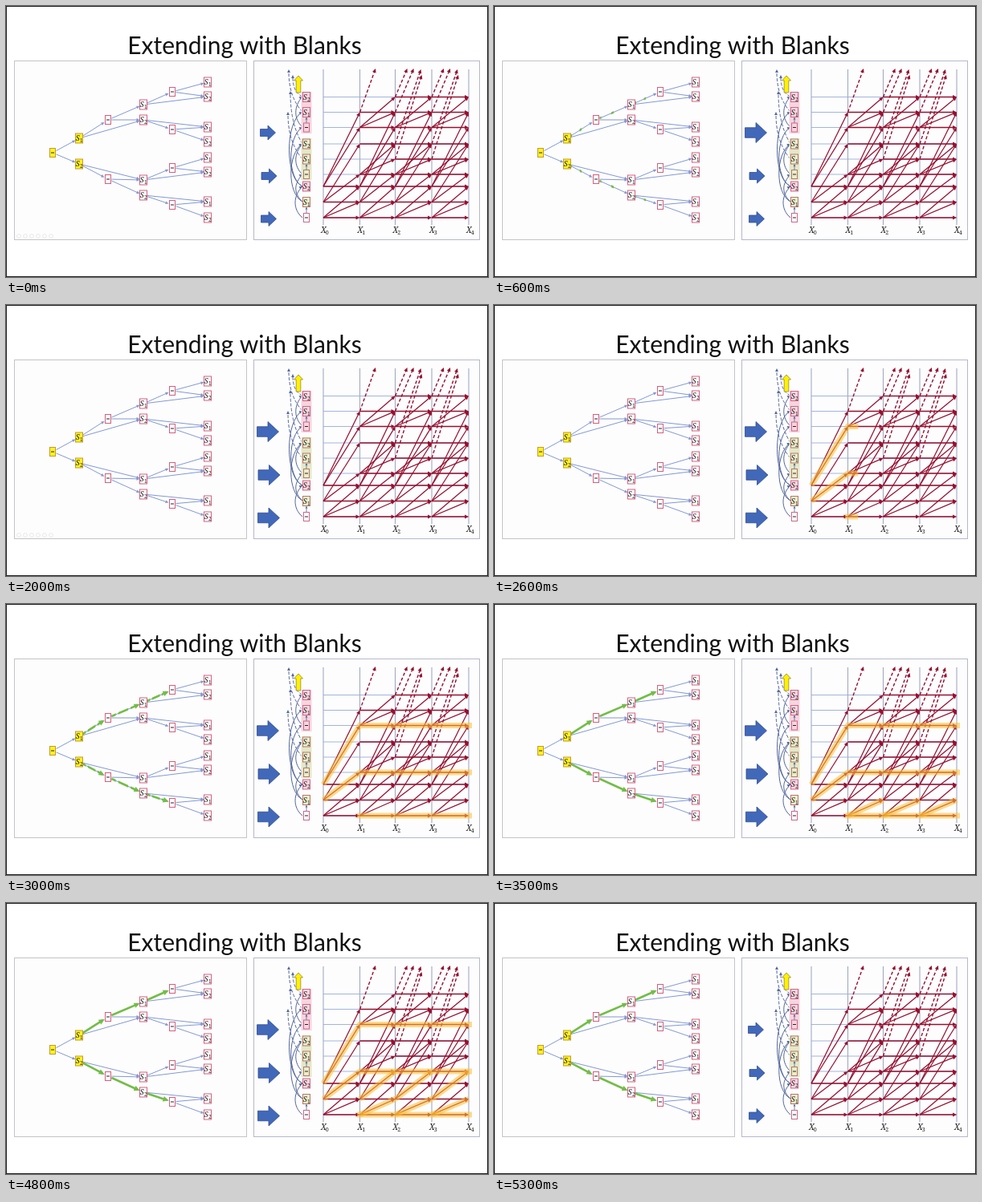
Recreate the animation shown at these times as an HTML page with a canvas. Size 600 by 338 pixels, loop 5.4 s.

```html
<!DOCTYPE html>
<html lang="en">
<head>
<meta charset="utf-8">
<title>Extending with Blanks</title>
<style>
html, body { margin: 0; width: 100%; height: 100%; overflow: hidden; background: #fff; }
canvas { display: block; width: 600px; height: 338px; }
</style>
</head>
<body>
<canvas id="stage" width="600" height="338"></canvas>
<script>
const ctx = document.getElementById('stage').getContext('2d');
const LOOP = 5400, STEP = 100;
const BLUE = '#8299d2', RED = '#96102f', GREEN = '#72bd46', INK = '#526699';
const SERIF = '"Noto Serif", "Liberation Serif", serif';

const clamp = v => Math.max(0, Math.min(1, v));
const ramp = (t, start, length) => clamp((t - start) / length);

function path(points, color, width, dash = []) {
  ctx.beginPath();
  points.forEach(([x, y]) => ctx.lineTo(x, y));
  ctx.strokeStyle = color;
  ctx.lineWidth = width;
  ctx.setLineDash(dash);
  ctx.stroke();
  ctx.setLineDash([]);
}

function head(x, y, angle, size, color) {
  ctx.save();
  ctx.translate(x, y);
  ctx.rotate(angle);
  ctx.beginPath();
  ctx.moveTo(0, 0);
  ctx.lineTo(-size, -size * 0.48);
  ctx.lineTo(-size, size * 0.48);
  ctx.closePath();
  ctx.fillStyle = color;
  ctx.fill();
  ctx.restore();
}

function arrow(from, to, color, width, size, dash) {
  const angle = Math.atan2(to[1] - from[1], to[0] - from[0]);
  const end = [to[0] - Math.cos(angle) * size * 0.6, to[1] - Math.sin(angle) * size * 0.6];
  path([from, end], color, width, dash);
  head(to[0], to[1], angle, size, color);
}

function box(x, y, w, h, fill, stroke, width = 1) {
  ctx.fillStyle = fill;
  ctx.fillRect(x, y, w, h);
  ctx.strokeStyle = stroke;
  ctx.lineWidth = width;
  ctx.strokeRect(x, y, w, h);
}

// A letter with a small lowered index, centred on x.
function symbol(letter, index, x, baseline, size) {
  ctx.fillStyle = '#222';
  ctx.textAlign = 'center';
  ctx.font = `italic ${size}px ${SERIF}`;
  ctx.fillText(letter, x - 1.8, baseline);
  ctx.font = `${size * 0.7}px ${SERIF}`;
  ctx.fillText(index, x + 2.7, baseline + 2);
}

// kind 0 is the blank, 1 and 2 are the symbols.
function node(x, y, kind, fill = '#fff', stroke = '#d4607c') {
  const w = kind ? 9 : 7, h = kind ? 12 : 11;
  box(x - w / 2, y - h / 2, w, h, fill, stroke);
  if (kind) symbol('S', kind, x, y + 3, 9);
  else path([[x - 2, y], [x + 2, y]], '#222', 1);
}

// Tree: x, y, kind
const tree = [
  [58, 183, 0], [91, 165, 1], [91, 197, 2], [127, 142, 0], [127, 216, 0],
  [171, 123, 1], [171, 142, 2], [171, 217, 1], [171, 236, 2],
  [207, 107, 0], [207, 154, 0], [207, 202, 0], [207, 248, 0],
  [251, 95, 1], [251, 113, 2], [251, 151, 1], [251, 169, 2],
  [251, 189, 1], [251, 207, 2], [251, 244, 1], [251, 264, 2]
];
const children = {
  0: [1, 2], 1: [3, 6], 2: [4, 7], 3: [5, 6], 4: [7, 8],
  5: [9, 14], 6: [10, 15], 7: [11, 18], 8: [12, 19],
  9: [13, 14], 10: [15, 16], 11: [17, 18], 12: [19, 20]
};
const marked = [[1, 3], [3, 5], [5, 9], [2, 4], [4, 8], [8, 12]];
const BARS = 12;

function ends(a, b) {
  const [x1, y1] = tree[a], [x2, y2] = tree[b];
  const slope = (y2 - y1) / (x2 - x1);
  return [[x1 + 4.5, y1 + 4.5 * slope], [x2 - 4.5, y2 - 4.5 * slope]];
}

// Reveals an edge in scattered vertical bars, the leftmost first.
function markedEdge(a, b, amount) {
  const [from, to] = ends(a, b);
  const barWidth = (to[0] - from[0] + 2) / BARS;
  ctx.save();
  ctx.beginPath();
  for (let i = 0; i < BARS; i++) {
    const order = (i * 5) % BARS;
    if ((order + 0.5) / BARS < amount) {
      ctx.rect(from[0] - 1 + i * barWidth, 80, barWidth + 0.05, 190);
    }
  }
  ctx.clip();
  arrow(from, to, GREEN, 2.6, 7);
  ctx.restore();
}

function drawTree(t) {
  for (const a in children) {
    for (const b of children[a]) arrow(...ends(a, b), BLUE, 1, 4);
  }
  const cycles = [[500, 1900], [2600, 3900], [4240, 5400]];
  const cycle = cycles.find(([start, end]) => t >= start && t < end);
  if (cycle) {
    const amount = ramp(t, cycle[0], 500);
    marked.forEach(([a, b]) => markedEdge(a, b, amount));
  }
  tree.forEach(([x, y, kind], i) =>
    node(x, y, kind, i < 3 ? '#fff21f' : '#fff', i < 3 ? '#c59a32' : '#d4607c'));
}

function drawToolbar(t) {
  if (!(t < 300 || (t >= 1900 && t < 2600) || (t >= 3900 && t < 4600))) return;
  ctx.strokeStyle = '#e4e4e4';
  ctx.lineWidth = 0.8;
  for (let i = 0; i < 6; i++) {
    ctx.beginPath();
    ctx.arc(16 + i * 8, 287, 2.4, 0, Math.PI * 2);
    ctx.stroke();
  }
}

// Trellis
const cols = [395, 440.5, 484.5, 530, 576];
const rows = [264, 244.5, 225, 210, 191, 172, 151.5, 132.5, 113.5];
const firstCol = [0, 0, 0, 1, 2, 1, 1, 1, 2];
const moves = [[0, 1], [0, 2], [1, 3], [1, 5], [2, 6], [2, 7], [3, 4], [3, 5], [6, 7], [6, 8]];
const at = (col, row) => [cols[col], rows[row]];

function drawTrellis() {
  rows.forEach(y => path([[395, y], [576, y]], '#a3b5dc', 1));
  cols.forEach(x => path([[x, 79], [x, 273]], '#a0aac2', 1.1));
  for (let c = 0; c < 4; c++) {
    rows.forEach((y, r) => {
      if (firstCol[r] <= c) arrow(at(c, r), at(c + 1, r), RED, 1.7, 5);
    });
    for (const [a, b] of moves) {
      if (firstCol[a] <= c) arrow(at(c, a), at(c + 1, b), RED, 1.25, 5);
    }
  }
  arrow(at(1, 7), [460, 78], RED, 1.4, 5, [4, 2.5]);
  for (const c of [2, 3]) {
    const x = cols[c];
    arrow([x, 113.5], [x + 15, 78], RED, 1.4, 5, [4, 2.5]);
    arrow([x, 132.5], [x + 23, 78], RED, 1.4, 5, [4, 2.5]);
    arrow([x, 172], [x + 32, 79], RED, 1.4, 5, [4, 2.5]);
    arrow([x, 191], [x + 33, 86], RED, 1.4, 5, [4, 2.5]);
  }
  cols.forEach((x, i) => symbol('X', i, x + 2, 283, 10));
}

function highlight(points, amount) {
  if (amount <= 0) return;
  ctx.save();
  ctx.beginPath();
  ctx.rect(388, 70, 196 * amount, 215);
  ctx.clip();
  path(points, 'rgba(255, 190, 48, 0.56)', 7);
  ctx.restore();
}

function drawHighlights(t) {
  if (t >= 4900) return;
  const rowsIn = ramp(t, 2500, 300), lowIn = ramp(t, 3100, 300), midIn = ramp(t, 3700, 300);
  highlight([at(0, 2), at(1, 6), [580, rows[6]]], rowsIn);
  highlight([at(0, 1), at(1, 3), [580, rows[3]]], rowsIn);
  highlight([[437, rows[0]], [580, rows[0]]], rowsIn);
  for (let c = 1; c < 4; c++) {
    highlight([at(c, 0), at(c + 1, 1)], lowIn);
    highlight([at(c, 1), at(c + 1, 3)], midIn);
  }
}

function curve(x, y1, y2, bulge, dash = []) {
  ctx.beginPath();
  ctx.moveTo(x, y1);
  ctx.bezierCurveTo(bulge, y1 - 10, bulge, y2 + 12, x, y2);
  ctx.strokeStyle = INK;
  ctx.lineWidth = 1;
  ctx.setLineDash(dash);
  ctx.stroke();
  ctx.setLineDash([]);
  head(x, y2, -0.5, 4, INK);
}

function escape(x, y, topX, topY) {
  ctx.beginPath();
  ctx.moveTo(x, y);
  ctx.quadraticCurveTo(topX, (y + topY) / 2 + 8, topX, topY + 3);
  ctx.strokeStyle = INK;
  ctx.lineWidth = 1;
  ctx.setLineDash([4, 2]);
  ctx.stroke();
  ctx.setLineDash([]);
  head(topX, topY, -Math.PI / 2, 4, INK);
}

function drawStates() {
  escape(369, 132, 352, 79);
  escape(369, 113, 357, 86);
  escape(369, 191, 351, 132);
  escape(369, 172, 354, 106);
  curve(369, 264, 225, 357);
  curve(369, 244, 210, 358);
  curve(369, 244, 172, 350);
  curve(369, 225, 151, 350);
  curve(369, 225, 132, 347);
  curve(369, 210, 172, 358);
  curve(369, 151, 113, 358);
  ctx.fillStyle = '#f5d5df';
  ctx.fillRect(367.5, 107, 13, 52);
  ctx.fillStyle = '#e3e8c8';
  ctx.fillRect(367.5, 165, 13, 52);
  for (const r of [0, 3, 6]) {
    arrow([374, rows[r] - 5], [374, rows[r + 1] + 6], INK, 0.8, 3);
  }
  rows.forEach((y, r) => {
    const pink = r === 2 || r > 5, green = r === 1 || (r > 2 && r < 6);
    node(374, y, r % 3, pink ? '#f8d5df' : green ? '#e9edcb' : '#fff', green ? '#ba7769' : '#cf6788');
  });
  shape([[364, 87], [369.5, 93], [366.8, 93], [366.8, 108], [361.2, 108], [361.2, 93], [358.5, 93]],
    '#fff100', '#9a8730');
}

function shape(points, fill, stroke) {
  ctx.beginPath();
  points.forEach(([x, y]) => ctx.lineTo(x, y));
  ctx.closePath();
  ctx.fillStyle = fill;
  ctx.fill();
  ctx.strokeStyle = stroke;
  ctx.lineWidth = 0.8;
  ctx.stroke();
}

function blockArrow(x, y, grow) {
  const w = 9.5 + 4 * grow, h = 9 + 3.5 * grow;
  shape([[x - w, y - h / 2], [x, y - h / 2], [x, y - h], [x + w, y],
    [x, y + h], [x, y + h / 2], [x - w, y + h / 2]], '#4268b9', '#324f91');
}

function drawBlockArrows(t) {
  const shrink = 1 - ramp(t, 4800, 100);
  [[326, 158, 300], [327.5, 212, 800], [327, 265.5, 1500]].forEach(([x, y, start]) =>
    blockArrow(x, y, ramp(t, start, 300) * shrink));
}

function draw(t) {
  ctx.fillStyle = '#fff';
  ctx.fillRect(0, 0, 600, 338);
  ctx.strokeStyle = '#222';
  ctx.lineWidth = 1;
  ctx.strokeRect(0.5, 0.5, 599, 337);
  ctx.fillStyle = '#111';
  ctx.textAlign = 'center';
  ctx.font = '30px Lato, sans-serif';
  ctx.fillText('Extending with Blanks', 297, 59.5);
  box(10.5, 68.5, 289, 223, '#fdfdfe', '#c4c4c8');
  box(308.5, 68.5, 281, 223, '#fdfdfe', '#b5b8cb');
  drawToolbar(t);
  drawTree(t);
  drawTrellis();
  drawHighlights(t);
  drawStates();
  drawBlockArrows(t);
}

const origin = performance.now();
function tick(now) {
  const t = Math.max(0, now - origin) % LOOP;
  draw(Math.floor(t / STEP) * STEP);
  requestAnimationFrame(tick);
}
draw(0);
requestAnimationFrame(tick);
</script>
</body>
</html>
```
